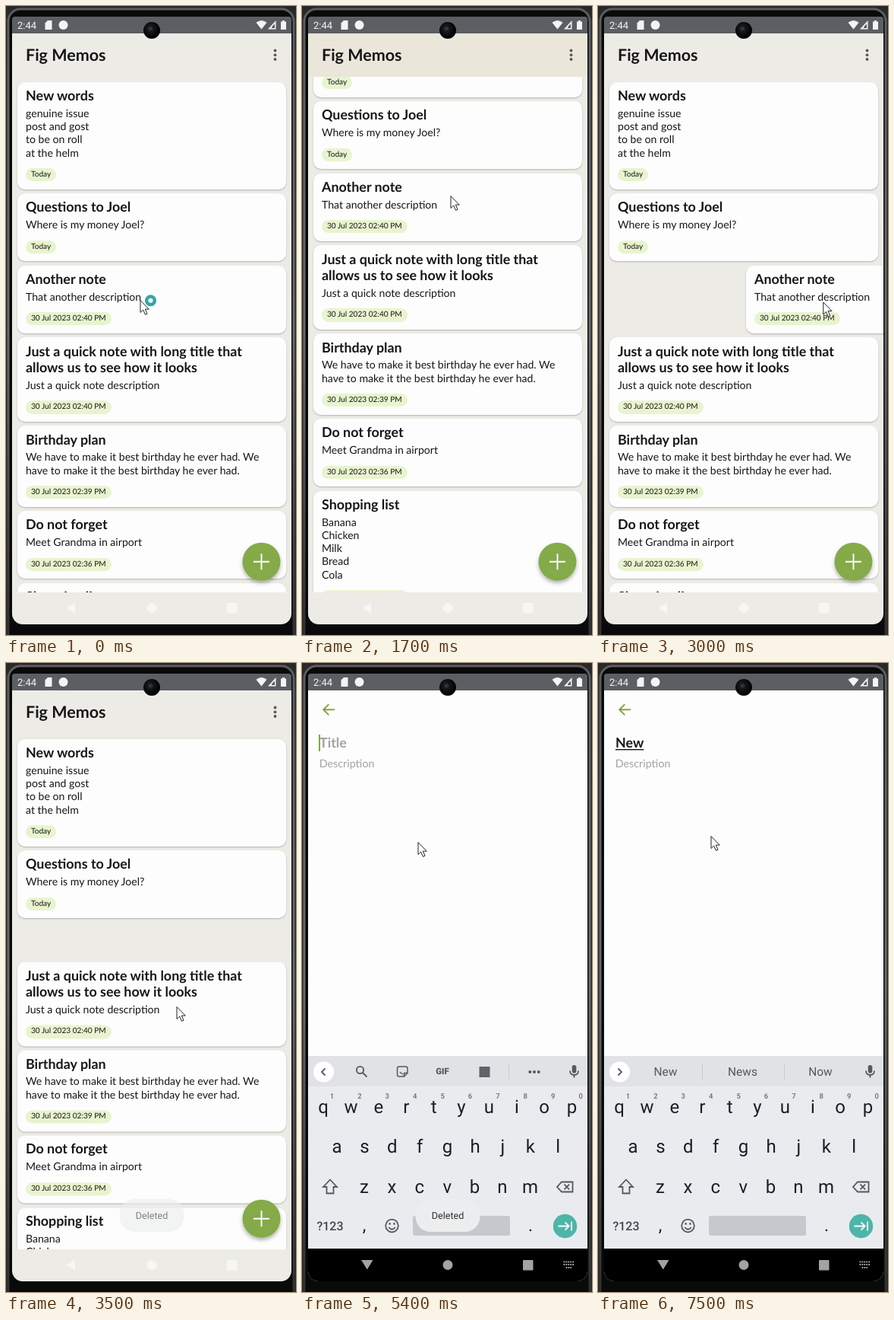
Recreate the animation shown at these times as an HTML page. Size 382 by 826 pixels, loop 8 s.

```html
<!DOCTYPE html>
<html lang="en">
<head>
<meta charset="utf-8">
<title>Notes app</title>
<style>
  html, body { margin: 0; width: 100%; height: 100%; overflow: hidden; background: #29292a; }
  #stage { position: relative; width: 382px; height: 826px; overflow: hidden; font-family: Lato, sans-serif; color: #161616; text-rendering: geometricPrecision; }
  #stage > svg { position: absolute; left: 0; top: 0; }
  #screen { position: absolute; left: 8px; top: 14px; width: 368px; height: 798px; background: #ecebe6; border-radius: 5px 5px 14px 14px; }
  #head { position: absolute; left: 8px; top: 36px; width: 368px; height: 57px; }
  #view { position: absolute; left: 8px; top: 93px; width: 368px; height: 677px; overflow: hidden; }
  #list { padding-top: 7px; }
  .card { box-sizing: border-box; margin: 0 7px 5.3px 6.7px; padding: 7.2px 11.3px 10.6px; border-radius: 10px; background: #fdfdfd; box-shadow: 0 1px 2px rgba(0, 0, 0, .24); white-space: pre; }
  .card b { display: block; font-size: 17.9px; line-height: 21.5px; }
  .card p { margin: 4.3px 0 11.3px; font-size: 14.1px; line-height: 17.2px; }
  .card i { display: block; width: max-content; padding: 0 7px; border-radius: 9px; background: #e8f4cf; font: 10.1px/17.2px Lato, sans-serif; }
  #glow { position: absolute; left: 10px; top: -46px; width: 380px; height: 92px; border-radius: 50%; background: rgba(253, 253, 244, .25); }
  .roboto { font-family: Roboto, sans-serif; }
  .mid { text-anchor: middle; }
  .line { fill: none; stroke: #54595e; stroke-width: 1.8; }
</style>
</head>
<body>
<div id="stage">
  <svg width="382" height="826">
    <linearGradient id="rim" x2="0" y2="1"><stop offset="0" stop-color="#5c5d5f"/><stop offset=".5" stop-color="#6a6b6d"/><stop offset="1" stop-color="#2c2c2d"/></linearGradient>
    <rect x="3" y="4" width="376" height="850" rx="16" fill="#0a0a0b" stroke="url(#rim)" stroke-width="3"/>
  </svg>
  <div id="screen"></div>
  <div id="view"><div id="list"></div><div id="glow"></div></div>
  <div id="head"></div>

  <svg width="382" height="826">
    <defs>
      <clipPath id="app"><rect x="8" y="36" width="368" height="733"/></clipPath>
      <filter id="lift" x="-50%" y="-50%" width="200%" height="200%"><feDropShadow dx="0" dy="3" stdDeviation="2.5" flood-opacity=".3"/></filter>
      <radialGradient id="lens" cx=".42" cy=".4"><stop offset="0" stop-color="#39424c"/><stop offset=".35" stop-color="#15181b"/><stop offset="1" stop-color="#020202"/></radialGradient>
    </defs>

    <g id="home">
      <text x="26" y="72" font-size="21.5" font-weight="700" fill="#161616">Fig Memos</text>
      <g fill="#58585a"><circle cx="354.5" cy="58.5" r="1.9"/><circle cx="354.5" cy="64.3" r="1.9"/><circle cx="354.5" cy="70" r="1.9"/></g>
      <circle cx="336.5" cy="729.7" r="25" fill="#85aa48" filter="url(#lift)"/>
      <path d="M326 729.7h21M336.5 719.2v21" stroke="#fff" stroke-width="1.9"/>
    </g>

    <g id="editor">
      <rect x="8" y="36" width="368" height="733" fill="#fdfdfd"/>
      <path d="M8 769h368v29a14 14 0 0 1-14 14H22a14 14 0 0 1-14-14z" fill="#000"/>
      <path d="M43 61.3H28.5M35.3 54.2l-7.1 7.1 7.1 7.1" fill="none" stroke="#82a93f" stroke-width="2"/>
      <text id="title" x="23" y="111.4" font-size="17.9" font-weight="700"></text>
      <rect id="under" x="23" y="113" height="1.4" fill="#161616"/>
      <text x="22.7" y="137" font-size="14.3" fill="#a0a3a4">Description</text>
      <rect id="caret" y="94" width="2" height="22" fill="#82a93f"/>
      <g clip-path="url(#app)"><g id="keyboard" class="roboto" fill="#172026">
        <rect x="8" y="516" width="368" height="253" fill="#e9ebef"/>
        <rect x="8" y="516" width="368" height="40" fill="#e0e2e6"/>
        <circle cx="28.5" cy="537" r="13.5" fill="#fff"/>
        <path id="chevron" class="line"/>
        <g id="tools">
          <g class="line"><circle cx="76.5" cy="534.5" r="4.6"/><path d="M80 538l5.5 5.5"/>
            <path d="M128 530h8.5q2.5 0 2.5 2.5v6l-4.5 4.5h-6.5q-2.5 0-2.5-2.5v-8q0-2.5 2.5-2.5zM139 538.5h-4.5v4.5M129 537q1.5 3 4 2.5" stroke-width="1.5"/></g>
          <text x="185" y="540.2" class="mid" font-size="11.5" font-weight="900" fill="#54595e">GIF</text>
          <rect x="233.5" y="530" width="14" height="14" fill="#5f6468"/>
          <path d="M272.5 527v20" stroke="#cbced2"/>
          <g fill="#54595e"><circle cx="300.3" cy="537" r="2"/><circle cx="306" cy="537" r="2"/><circle cx="311.7" cy="537" r="2"/></g>
        </g>
        <g id="words" class="mid" font-size="15.5" fill="#54595e">
          <path d="M137.5 526v21M245.5 526v21" stroke="#c6c9cd"/>
          <text x="89" y="542.3"></text><text x="190.5" y="542.3"></text><text x="293" y="542.3"></text>
        </g>
        <rect x="355.7" y="528" width="5.6" height="10.5" rx="2.8" fill="#54595e"/>
        <path class="line" d="M353 535.5q0 5.5 5.5 5.5t5.5-5.5M358.5 541v3.5" stroke-width="1.6"/>
        <g id="keys" class="mid"></g>
        <path class="line" d="M37 678.5l9 9.5h-4.5v8.5h-9v-8.5H28z"/>
        <path class="line" d="M342 681.5h14.5v13H342l-6-6.5zM345.5 684.7l6.6 6.6m0-6.6l-6.6 6.6" stroke-width="1.6"/>
        <text x="37" y="745.2" class="mid" font-size="16" font-weight="500" fill="#41474c">?123</text>
        <text x="82" y="746" class="mid" font-size="23">,</text><text x="301" y="746" class="mid" font-size="23">.</text>
        <circle class="line" cx="118.5" cy="739" r="8.3" stroke-width="1.6"/>
        <path class="line" d="M114.2 741q4.3 5.5 8.6 0" stroke-width="1.6"/>
        <circle cx="115.6" cy="736.4" r="1.3" fill="#54595e"/><circle cx="121.4" cy="736.4" r="1.3" fill="#54595e"/>
        <rect x="146" y="726" width="128" height="26" rx="3" fill="#c5c8cd"/>
        <circle cx="346.5" cy="739.5" r="15.7" fill="#4db5a9"/>
        <path d="M337.5 739.5h14M346.5 734.3l5.2 5.2-5.2 5.2M355 733.5v12" fill="none" stroke="#fff" stroke-width="1.8"/>
      </g></g>
    </g>

    <g id="nav">
      <path id="back"/><circle cx="192" cy="790.5" r="6.5"/><rect x="291" y="784" width="13.5" height="13.5" rx="1"/>
    </g>
    <path id="pad" d="M344.5 786.5h13.5M344.5 790h13.5M347.5 794h7.5" stroke="#a3a3a3" stroke-width="1.8" stroke-dasharray="1.8 1.1"/>

    <g id="toast" class="roboto">
      <rect x="149.5" y="704" width="85" height="43" rx="20" fill="#ecedee"/>
      <text x="192" y="730.3" class="mid" font-size="12.6" fill="#333">Deleted</text>
    </g>

    <g fill="#f4f4f4">
      <path d="M8 36V18q0-4 4-4H372q4 0 4 4V36z" fill="#5b5f63"/>
      <text x="15" y="29.7" class="roboto" font-size="13">2:44</text>
      <path d="M51.5 22.5l3.5-3.5h5.5v12h-9z"/>
      <circle cx="75.5" cy="25" r="6"/>
      <path d="M329.5 21.7q7-5.5 14 0l-7 8.8zM355.5 19v11.5H345z"/>
      <path d="M350 27.5l4-4v5.5h-4z" fill="#5b5f63"/>
      <path d="M362 20.5h2v-1.5h3v1.5h2v10.5h-7z"/>
    </g>
    <circle cx="192" cy="32" r="11" fill="url(#lens)"/>

    <g id="pointer">
      <path d="M.5.5v16l3.7-3.5 2.7 6.3 2.6-1.1-2.7-6.1h5z" fill="#fff" stroke="#222" stroke-width="1"/>
      <circle id="busy" cx="14" cy=".8" r="5.3" fill="#fff" stroke="#35a6a3" stroke-width="4.5"/>
    </g>
  </svg>
</div>
<script>
const $ = id => document.getElementById(id);
const LOOP = 8000, STEP = 100, ROW = 94.6, SWIPED = 2;

const notes = [
  ['New words', 'genuine issue\npost and gost\nto be on roll\nat the helm', 'Today'],
  ['Questions to Joel', 'Where is my money Joel?', 'Today'],
  ['Another note', 'That another description', '30 Jul 2023 02:40 PM'],
  ['Just a quick note with long title that\nallows us to see how it looks', 'Just a quick note description', '30 Jul 2023 02:40 PM'],
  ['Birthday plan', 'We have to make it best birthday he ever had. We\nhave to make it the best birthday he ever had.', '30 Jul 2023 02:39 PM'],
  ['Do not forget', 'Meet Grandma in airport', '30 Jul 2023 02:36 PM'],
  ['Shopping list', 'Banana\nChicken\nMilk\nBread\nCola', '30 Jul 2023 02:35 PM'],
];
$('list').innerHTML = notes.map(([title, body, date]) =>
  `<div class="card"><b>${title}</b><p>${body}</p><i>${date}</i></div>`).join('');
const cards = [...$('list').children];

const keyRow = (letters, x, y) => [...letters].map((c, i) =>
  `<text x="${x + 36.4 * i}" y="${y}" font-size="24">${c}</text>`).join('');
const digits = [...'1234567890'].map((c, i) =>
  `<text x="${39.5 + 36.4 * i}" y="572" font-size="9.5" font-weight="500" fill="#666c72">${c}</text>`).join('');
$('keys').innerHTML = keyRow('qwertyuiop', 28, 590.5) + keyRow('asdfghjkl', 46, 642.5) + keyRow('zxcvbnm', 82, 695.5) + digits;

// Each track row: time, then one or more values
const tracks = {
  pointer: [[0, 176.5, 386], [200, 175, 503], [500, 175, 503], [600, 176, 485], [1300, 190, 225], [1500, 193, 221],
    [1700, 195.5, 249], [2000, 205, 371], [2300, 226, 463], [2600, 160, 385], [2700, 165, 384], [3100, 340, 390],
    [3200, 338, 397], [3500, 224.5, 451], [4100, 214, 440], [4600, 204.5, 427], [4900, 336, 731], [5000, 336, 731],
    [5400, 152.5, 235], [5800, 148.5, 227]],
  scroll: [[500, 0], [600, 12], [1300, 151], [1500, 150], [1700, 121], [2000, 0]],
  glow: [[2000, 0], [2200, 1], [2400, .8], [2700, 0]],
  swipe: [[2700, 0], [3100, 240], [3200, 380]],
  close: [[3400, 0], [3500, .45], [3600, .93], [3700, 1]],
  toast: [[3300, 0], [3500, .6], [3700, 1], [5500, 1], [5800, 0]],
  editor: [[5000, 0], [5100, .4], [5200, 1]],
  keyboard: [[5200, 253], [5300, 60], [5400, 0]],
};

function sample(rows, t) {
  const n = rows.findIndex(r => r[0] > t);
  if (n === 0) return rows[0].slice(1);
  if (n < 0) return rows.at(-1).slice(1);
  const a = rows[n - 1], b = rows[n], k = (t - a[0]) / (b[0] - a[0]);
  return a.slice(1).map((v, i) => v + (b[i + 1] - v) * k);
}

// Time, value: the latest entry holds
const typed = [[0, ''], [6500, 'N'], [6800, 'Ne'], [7000, 'New']];
const hints = [[0, ''], [6600, 'N No Not'], [6900, 'New Need Next'], [7000, 'New News Now']];
const caretOn = [[0, false], [5200, true], [5700, false], [6200, true], [7500, false]];
const held = (rows, t) => rows.findLast(r => r[0] <= t)[1];
const show = (el, on) => { el.style.display = on ? '' : 'none'; };

function render(t) {
  const at = name => sample(tracks[name], t)[0];
  const [x, y] = sample(tracks.pointer, t);
  $('pointer').setAttribute('transform', `translate(${x} ${y})`);
  show($('busy'), t < 200);

  const scroll = at('scroll'), close = at('close');
  $('list').style.transform = `translateY(${-scroll}px)`;
  $('head').style.background = scroll > 0 ? '#eae6da' : '#ecebe6';
  $('glow').style.opacity = at('glow');
  cards.forEach((card, i) => {
    card.style.transform = i === SWIPED ? `translateX(${at('swipe')}px)`
      : `translateY(${i > SWIPED ? -ROW * close : 0}px)`;
  });
  $('toast').setAttribute('opacity', at('toast'));

  const editor = at('editor'), open = editor === 1;
  $('editor').setAttribute('opacity', editor);
  show($('home'), !open);
  $('keyboard').setAttribute('transform', `translate(0 ${at('keyboard')})`);
  $('nav').setAttribute('fill', open ? '#a3a3a3' : '#f6f6f4');
  $('back').setAttribute('d', open ? 'M78 784h15.5l-7.7 12.5z' : 'M91 783.5v14l-12-7z');
  show($('pad'), open);

  const text = held(typed, t), words = held(hints, t);
  const title = $('title');
  title.textContent = text || 'Title';
  title.setAttribute('fill', text ? '#161616' : '#a0a3a4');
  const width = text ? title.getComputedTextLength() : 0;
  $('under').setAttribute('width', width);
  $('caret').setAttribute('x', 22 + width);
  show($('caret'), held(caretOn, t));
  show($('tools'), !words);
  show($('words'), words);
  $('chevron').setAttribute('d', words ? 'M26.5 532.5l4.5 4.5-4.5 4.5' : 'M30.5 532.5l-4.5 4.5 4.5 4.5');
  const parts = words.split(' ');
  $('words').querySelectorAll('text').forEach((el, i) => { el.textContent = parts[i] || ''; });
}

const start = performance.now();
function tick() {
  const t = (performance.now() - start) % LOOP;
  render(Math.floor(t / STEP) * STEP);
  requestAnimationFrame(tick);
}
tick();
</script>
</body>
</html>
```
